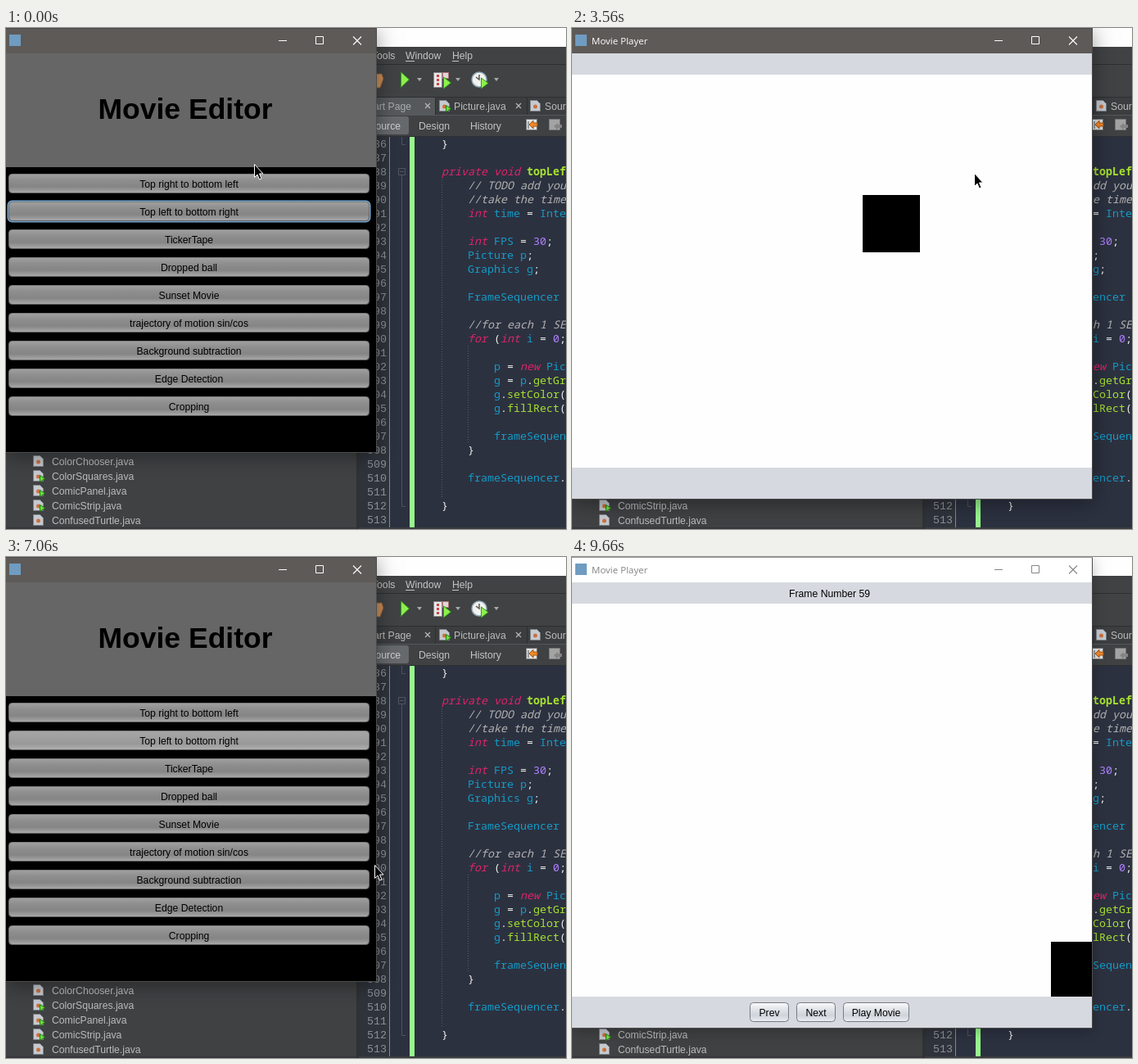
Animation, 684 px wide and 612 px high, one loop 9.73 s. Source, as an HTML page with a canvas:

```html
<!DOCTYPE html>
<html lang="en">
<head>
<meta charset="utf-8">
<title>Movie Editor</title>
<style>
html, body { margin: 0; width: 100%; height: 100%; overflow: hidden; background: #2c3140; }
canvas { display: block; }
</style>
</head>
<body>
<canvas id="stage" width="684" height="612"></canvas>
<script>
const c = document.getElementById('stage').getContext('2d');
const LOOP = 9730;
const SANS = '"Liberation Sans", Arial, sans-serif';
const TITLE = '"Open Sans", "Noto Sans", sans-serif';
const MONO = '"Noto Sans Mono", "DejaVu Sans Mono", monospace';

const clamp = v => Math.max(0, Math.min(1, v));
const within = (t, spans) => spans.some(([a, b]) => t >= a && t < b);

function rect(x, y, w, h, fill) {
  c.fillStyle = fill;
  c.fillRect(x, y, w, h);
}
function round(x, y, w, h, r, fill, stroke, width = 1) {
  c.beginPath();
  c.roundRect(x, y, w, h, r);
  if (fill) { c.fillStyle = fill; c.fill(); }
  if (stroke) { c.strokeStyle = stroke; c.lineWidth = width; c.stroke(); }
}
function line(color, width, ...points) {
  c.strokeStyle = color;
  c.lineWidth = width;
  c.beginPath();
  points.forEach(([x, y]) => c.lineTo(x, y));
  c.stroke();
}
function poly(fill, stroke, points) {
  c.beginPath();
  points.forEach(([x, y]) => c.lineTo(x, y));
  c.closePath();
  c.fillStyle = fill;
  c.fill();
  if (stroke) { c.strokeStyle = stroke; c.lineWidth = 1; c.stroke(); }
}
function disc(x, y, r, fill, stroke) {
  round(x - r, y - r, 2 * r, 2 * r, r, fill, stroke, 1.5);
}
function text(s, x, y, color, font = '12.2px ' + SANS, align = 'left') {
  c.font = font;
  c.textAlign = align;
  c.fillStyle = color;
  c.fillText(s, x, y);
}
function gradient(y, h, colors) {
  const g = c.createLinearGradient(0, y, 0, y + h);
  colors.forEach((col, i) => g.addColorStop(i / (colors.length - 1), col));
  return g;
}

// ---- code editor behind the windows ----
const CODE = {
  486: '    }',
  488: '    private void topLeftToBottomRight(',
  489: '        // TODO add your handling code here:',
  490: '        //take the time from the user',
  491: '        int time = Integer.parseInt(',
  493: '        int FPS = 30;',
  494: '        Picture p;',
  495: '        Graphics g;',
  497: '        FrameSequencer frameSequencer',
  499: '        //for each 1 SECOND',
  500: '        for (int i = 0; i',
  502: '            p = new Picture(',
  503: '            g = p.getGraphics(',
  504: '            g.setColor(',
  505: '            g.fillRect(',
  507: '            frameSequencer.',
  508: '        }',
  510: '        frameSequencer.',
  512: '    }'
};
const TOKEN = /\/\/.*|\w+|[^\w\s]/g;

function tokenStyle(word, next) {
  if (word.startsWith('//')) return ['#b2b2b0', 'italic '];
  if (/^(private|void|int|for|new)$/.test(word)) return ['#dc2468', 'italic '];
  if (/^\d/.test(word)) return ['#ae81ff', ''];
  if (/^\w/.test(word)) {
    if (next !== '(' || word === 'Picture') return ['#159bc6', ''];
    return ['#a6e22e', word.startsWith('topLeft') ? 'bold ' : ''];
  }
  return ['#f0f0ea', ''];
}
function drawCode() {
  rect(431, 133, 253, 479, '#2c3140');
  rect(431, 133, 37, 479, '#2f333b');
  rect(468, 133, 1, 479, '#85888c');
  rect(493, 133, 6, 477, '#98f78e');
  line('#4e535d', 1, [483.5, 133], [483.5, 142.5], [488, 142.5]);
  line('#4e535d', 1, [483.5, 180], [483.5, 584.5], [488, 584.5]);
  round(479.5, 171.5, 8, 8, 0, null, '#50555f');
  line('#50555f', 1, [481, 175.5], [486, 175.5]);
  c.setLineDash([1, 2]);
  line('#585d66', 1, [532.5, 185], [532.5, 575]);
  line('#585d66', 1, [564.5, 388], [564.5, 508]);
  c.setLineDash([]);
  for (let n = 486; n <= 513; n++) {
    const y = 146 + 17 * (n - 486);
    text(n, 441, y, '#8a9097', '13.3px "Liberation Mono", monospace');
    const row = CODE[n] || '';
    for (const m of row.matchAll(TOKEN)) {
      const [color, style] = tokenStyle(m[0], row[m.index + m[0].length]);
      text(m[0], 500 + 8 * m.index, y, color, style + '13.33px ' + MONO);
    }
  }
  rect(431, 610, 253, 2, '#3a3c3e');
}
function fileIcon(x, y, runnable) {
  poly('#c6cad0', '#7d838a', [[x, y], [x + 8, y], [x + 12, y + 4], [x + 12, y + 13], [x, y + 13]]);
  disc(x + 6, y + 7.5, 2.5, '#c9723f');
  if (runnable) poly('#6fe03c', '#247a14', [[x + 8, y + 6], [x + 14, y + 10], [x + 8, y + 14]]);
}
function drawIde(tabHot) {
  rect(0, 0, 684, 612, '#404244');
  rect(0, 0, 684, 23, '#fefefe');
  rect(0, 44, 684, 1, '#2d2f31');
  text('Tools', 447, 38, '#c4c4c4');
  text('Window', 488, 38, '#c4c4c4');
  text('Help', 545, 38, '#c4c4c4');
  rect(488, 40, 11, 1, '#c4c4c4');
  rect(545, 40, 8, 1, '#c4c4c4');

  poly('#c98d58', '#855a35', [[450, 56], [459, 56], [461, 62], [457, 73], [450, 73]]);
  poly('#8df04c', '#2c9a18', [[482.5, 54], [492.5, 63], [482.5, 72.5]]);
  round(522.5, 54.5, 10, 18, 0, '#e8e8e8', '#888');
  for (let i = 0; i < 3; i++) rect(526, 57 + 5 * i, 3, 3, '#cc4545');
  round(533.5, 54.5, 7, 7, 0, '#e4d4d4', '#a77');
  poly('#8df04c', '#2c9a18', [[534.5, 60], [543.5, 67], [534.5, 74]]);
  disc(578, 63, 9, '#f2f2ee', '#8fa9bb');
  line('#555', 1.5, [578, 57], [578, 63], [574, 60]);
  poly('#8df04c', '#2c9a18', [[580.5, 61], [589, 67.5], [580.5, 74]]);
  for (const x of [505, 552, 599]) poly('#a8a8a8', null, [[x - 3, 61], [x + 3, 61], [x, 65]]);

  rect(431, 84, 253, 1, '#2d2f31');
  rect(431, 85, 253, 21, '#3b3d3f');
  if (tabHot) rect(431, 85, 93, 21, '#56595c');
  text('Start Page', 495, 100, tabHot ? '#a9adb0' : '#bcbcbc', undefined, 'right');
  text('Picture.java', 547, 100, '#bcbcbc');
  text('Source.java', 658, 100, '#bcbcbc');
  for (const x of [515, 626]) {
    line('#b5b5b5', 1.2, [x - 3, 92], [x + 3, 98]);
    line('#b5b5b5', 1.2, [x + 3, 92], [x - 3, 98]);
  }
  fileIcon(529.5, 88.5, true);
  fileIcon(640.5, 88.5);
  rect(524, 85, 1, 21, '#2d2f31');
  rect(636, 85, 1, 21, '#2d2f31');
  rect(431, 106, 253, 27, '#3f4143');
  rect(431, 106, 253, 1, '#55585a');
  round(436, 108, 56, 22, 3, '#65696b');
  text('Source', 482, 124, '#cfcfcf', undefined, 'right');
  text('Design', 504, 124, '#c4c4c4');
  text('History', 567, 124, '#c4c4c4');
  round(635.5, 111.5, 13, 13, 0, '#dfe3e6', '#777');
  line('#555', 1, [638, 114], [638, 123]);
  poly('#ef8a2c', '#a8540f', [[639, 118], [644, 113], [644, 116], [649, 116], [649, 120], [644, 120], [644, 123]]);
  round(663.5, 111.5, 13, 13, 0, '#a3a3a3', '#777');
  poly('#858585', null, [[669, 120], [674, 116], [674, 118], [679, 118], [679, 122], [674, 122], [674, 125]]);
  rect(431, 132, 253, 1, '#2d2f31');
  drawCode();

  rect(0, 500, 428, 112, '#3f4143');
  ['ColorChooser', 'ColorSquares', 'ComicPanel', 'ComicStrip', 'ConfusedTurtle'].forEach((name, i) => {
    const y = 530 + 18 * i;
    fileIcon(33.5, y - 7.5, i > 0 && i < 4);
    text(name + '.java', 56, y + 4, '#bcbcbc');
  });
  rect(428, 500, 3, 112, '#2f3133');
  rect(0, 610, 428, 2, '#35373a');
}

// ---- windows ----
function frame(w, h, title, active, full = true, hot = false) {
  c.save();
  c.shadowColor = active ? 'rgba(0,0,0,.4)' : 'rgba(0,0,0,.25)';
  c.shadowBlur = active ? 24 : 16;
  c.shadowOffsetY = 4;
  rect(0, 0, w, h, '#4c4c4c');
  c.restore();
  const ink = active ? '#fff' : '#858585';
  rect(0, 0, w - 1, 31, active ? '#5d5a58' : '#fff');
  rect(0, 0, w, 1, active ? '#4c4a48' : '#9a9a9a');
  rect(4, 8, 14, 14, '#6f9cc0');
  text(title, 24, 20, ink, '11.5px ' + TITLE);
  if (hot) rect(w - 47, 1, 46, 29, '#e81123');
  if (full) {
    rect(w - 120, 15, 10, 1, ink);
    round(w - 74.5, 10.5, 9, 9, 0, null, ink);
  }
  line(ink, 1.1, [w - 29, 10.5], [w - 19, 20.5]);
  line(ink, 1.1, [w - 19, 10.5], [w - 29, 20.5]);
}
function pushButton(label, x, y, w) {
  round(x + .5, y + .5, w - 1, 23, 4, gradient(y, 24, ['#fbfbfc', '#e3e6ea', '#cfd4db', '#eef0f3']), '#757b84');
  text(label, x + w / 2, y + 17, '#000', undefined, 'center');
}

const ACTIONS = ['Top right to bottom left', 'Top left to bottom right', 'TickerTape', 'Dropped ball', 'Sunset Movie',
  'trajectory of motion sin/cos', 'Background subtraction', 'Edge Detection', 'Cropping'];

function drawEditor(t) {
  const inactive = within(t, [[830, 2300], [2960, 5000], [5660, 7000], [7800, LOOP]]);
  const lit = t < 450 ? -1 : t < 5000 ? 0 : t < 5300 ? -1 : 1;
  const focus = t < 660 ? 1 : within(t, [[5000, 5500]]) ? 0 : -1;
  frame(453, 519, '', !inactive);
  rect(0, 31, 452, 139, '#666');
  text('Movie Editor', 219, 111, '#000', 'bold 35.5px ' + SANS, 'center');
  rect(0, 170, 452, 348, '#000');
  ACTIONS.forEach((label, i) => {
    const y = 178 + 34 * i;
    const shades = i === lit ? ['#a6a6a6', '#a0a0a0', '#989898', '#b2b2b2'] : ['#a2a2a2', '#8e8e8e', '#858585', '#acacac'];
    if (i === focus) round(2.5, y - .5, 442, 25, 5, null, '#73a4d1', 2);
    round(3.5, y + .5, 440, 23, 4, gradient(y, 24, shades), gradient(y, 24, ['#7c7c7c', '#5c5c5c']));
    text(label, 223.5, y + 17, '#000', undefined, 'center');
  });
}

// Fade and scale a window in and out around its centre.
function popup(t, open, close, x, y, w, h, draw) {
  const p = Math.min(clamp((t - open + 30) / 200), 1 - clamp((t - close) / 150));
  if (t < open || p <= 0) return;
  const e = 1 - (1 - p) ** 3, s = .9 + .1 * e;
  c.save();
  c.globalAlpha = e;
  c.translate(x + w / 2, y + h / 2);
  c.scale(s, s);
  c.translate(-w / 2, -h / 2);
  draw();
  c.restore();
}
function drawDialog(value) {
  frame(310, 128, 'Input', true, false);
  rect(1, 31, 308, 96, '#d6d9df');
  disc(28, 60, 15, '#4b8fae', '#2f6883');
  text('?', 28, 68, '#fff', 'bold 22px ' + SANS, 'center');
  text('How many seconds is the movie?', 58, 50, '#000');
  round(58.5, 57.5, 238, 23, 0, '#fff', '#8d9299');
  text(value, 65, 73, '#000');
  pushButton('OK', 91, 93, 51);
  pushButton('Cancel', 148, 93, 71);
}
function drawPlayer(t, start, fromRight, hot) {
  const step = Math.max(0, Math.floor((t - start) / 35));
  const n = Math.min(59, Math.floor(step * 1.4 + 1e-6));
  frame(636, 576, 'Movie Player', t < 9660, true, hot);
  rect(0, 31, 635, 544, '#d6d9df');
  rect(0, 57, 635, 480, '#fefefe');
  c.save();
  c.beginPath();
  c.rect(0, 57, 635, 480);
  c.clip();
  rect((fromRight ? 570 - 10 * n : 10 * n) - 5, 57 + 7 * n, 70, 70, '#000');
  c.restore();
  if (step < 43) return;
  text('Frame Number ' + n, 314.5, 49, '#000', undefined, 'center');
  pushButton('Prev', 217, 544, 48);
  pushButton('Next', 274, 544, 48);
  pushButton('Play Movie', 331, 544, 81);
}

// ---- pointer: time, x, y ----
const PATH = [[0, 303, 167], [30, 303, 167], [490, 292, 196], [830, 292, 196],
  [1020, 664, 400], [1400, 664, 400], [1750, 455, 377], [2050, 455, 377], [2350, 530, 150], [2400, 530, 150],
  [2490, 572, 154], [2960, 572, 154], [3400, 491, 178], [4400, 491, 178], [4880, 612, 16], [5000, 612, 16],
  [5320, 286, 221], [5800, 286, 221], [5860, 473, 355], [6260, 473, 355], [6700, 450, 377], [8800, 450, 377],
  [9260, 640, 612], [LOOP, 640, 612]];

function pointerAt(t) {
  const i = PATH.findIndex(k => k[0] > t);
  const [t0, x0, y0] = PATH[i - 1], [t1, x1, y1] = PATH[i];
  const p = (t - t0) / (t1 - t0), e = p * p * (3 - 2 * p);
  return [Math.round(x0 + (x1 - x0) * e), Math.round(y0 + (y1 - y0) * e)];
}
function drawPointer(t, x, y) {
  if (within(t, [[5860, 6260], [7660, 7800], [9260, LOOP]])) return;
  const overDialog = within(t, [[1400, 2200], [6260, 6890]]) && x > 345 && x < 655 && y > 272 && y < 400;
  const overPlayer = within(t, [[2960, 5000], [7800, LOOP]]) && x < 636 && y < 576;
  c.save();
  c.translate(x + .5, y - .5);
  if (x > 500 && y > 133 && !overDialog && !overPlayer) {
    for (const [color, w, r] of [['#fff', 3, 4], ['#000', 1, 3]]) {
      line(color, w, [-r, -7], [r, -7]);
      line(color, w, [0, -7], [0, 8]);
      line(color, w, [-r, 8], [r, 8]);
    }
  } else {
    poly('#000', '#fff', [[0, 0], [0, 16], [3.5, 12.5], [6, 18.5], [8.5, 17.5], [6, 11.5], [10.5, 11.5]]);
  }
  c.restore();
}

function draw(now) {
  const t = now % LOOP;
  const [x, y] = pointerAt(t);
  const hot = t > 4400 && x > 588 && y < 31;
  drawIde(t < 60);
  drawEditor(t);
  popup(t, 1400, 2200, 345, 272, 310, 128, () => drawDialog(t > 1900 ? '2' : ''));
  popup(t, 6260, 6890, 345, 272, 310, 128, () => drawDialog(t > 6550 ? '2' : ''));
  popup(t, 2960, 5000, 0, 0, 636, 576, () => drawPlayer(t, 3035, true, hot));
  popup(t, 7800, LOOP, 0, 0, 636, 576, () => drawPlayer(t, 7745, false, false));
  drawPointer(t, x, y);
}

let begin;
function tick(now) {
  begin ??= now;
  draw(now - begin);
  requestAnimationFrame(tick);
}
draw(0);
requestAnimationFrame(tick);
</script>
</body>
</html>
```
